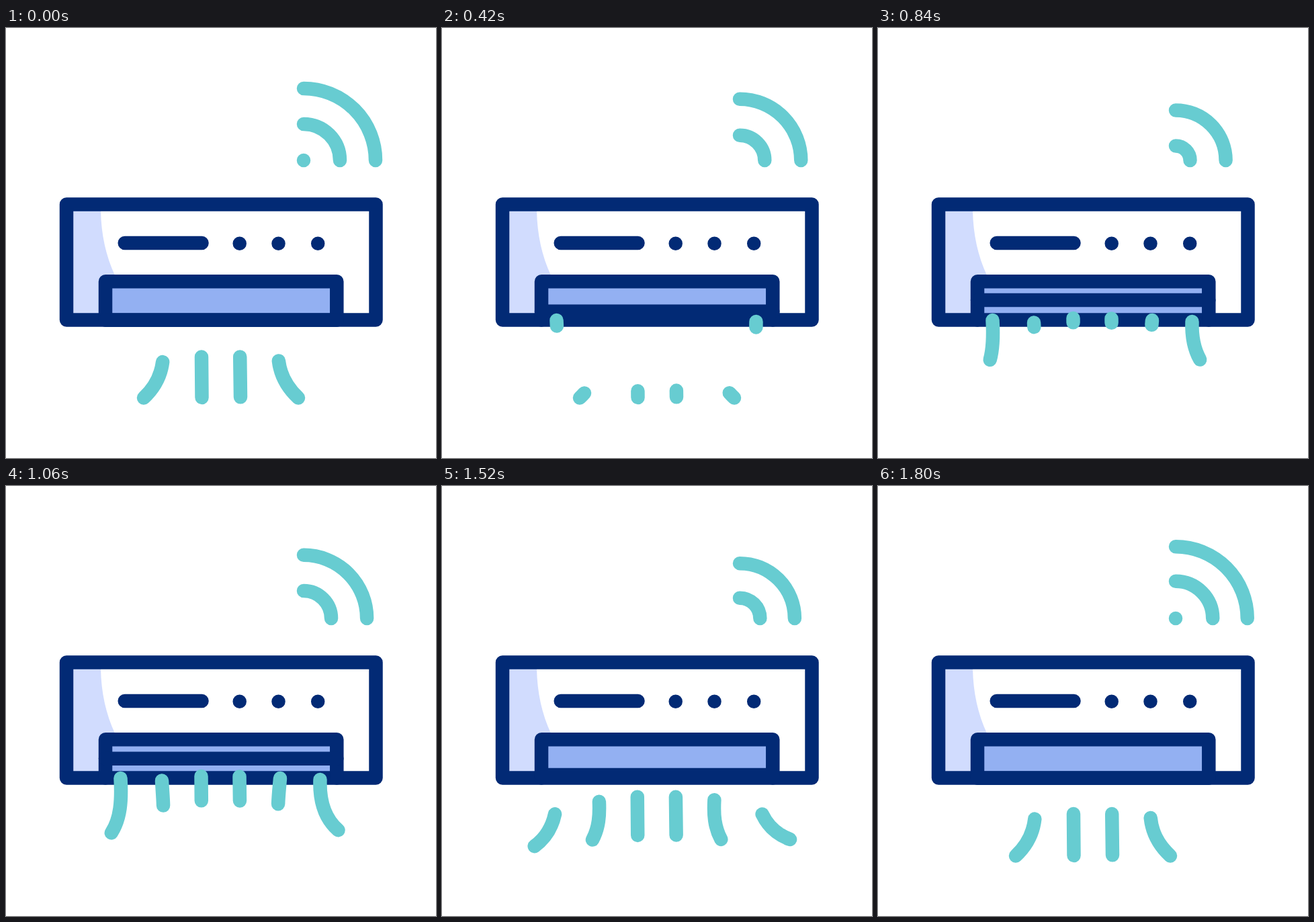
These frames come from a looping animation (640 px wide and 640 px high, 1.82 s). An HTML page:

```html
<!DOCTYPE html>
<html lang="en">
<head>
<meta charset="utf-8">
<title>Smart air conditioner</title>
<style>
  html, body { margin: 0; width: 100%; height: 100%; overflow: hidden; background: #fff; }
  svg { display: block; width: 100%; height: 100%; }
  .line { fill: none; stroke-width: 20.5; stroke-linecap: round; stroke-linejoin: round; }
  .navy { stroke: #022a75; }
  .teal { stroke: #67ccd1; }
</style>
</head>
<body>
<svg viewBox="0 0 640 640">
  <path fill="#d1dcfe" d="M95 267H141V272Q142 325 162 368V430H95Z"/>
  <rect x="148" y="377" width="344" height="57" fill="#93b0f2"/>
  <g class="line navy">
    <rect x="90" y="262.5" width="460.5" height="172"/>
    <path d="M148 434.5V377.3H492.3V434.5"/>
    <path id="louver" d="M148 0H492.3"/>
    <path d="M176.7 320H291.5M347.7 320.7h.01M405.5 320.7h.01M464.2 320.7h.01"/>
  </g>
  <g id="waves" class="line teal"></g>
  <g id="air" class="line teal"></g>
</svg>
<script>
const LOOP = 1820, STEP = 20;
const WAVE = { x: 443, y: 197, speed: 0.0888, maxRadius: 118.2,
               births: [-1205, -608, 0, 598, 1178, 1800] };

// Each track is a list of [time, fraction of the path].
const outer = {
  head: [[350, 0], [420, .073], [640, .32], [1060, .73], [1320, .9], [1520, .972], [1700, 1]],
  tail: [[1190, 0], [1320, .15], [1520, .465], [1770, 1]]
};
const innerOut = {
  head: [[790, 0], [855, .07], [1060, .308], [1320, .55], [1520, .745], [1800, 1]],
  tail: [[1175, 0], [1320, .106], [1520, .26], [1800, .475]]
};
const innerRest = { head: [[0, 1]], tail: [[0, .487], [420, .917], [500, 1]] };

const streams = [
  ['M170.5 435C173 480 169 515 135 538', [outer]],
  ['M232 438.5C234 480 242 516 205 550.5', [innerRest, innerOut]],
  ['M290.5 432L291.5 550', [innerRest, innerOut]],
  ['M347.5 432.5L349 549.3', [innerRest, innerOut]],
  ['M408 435C404 482 398 516 435 550.5', [innerRest, innerOut]],
  ['M467.5 437C466 480 482 514 521 527', [outer]]
];

function addPath(parent, d = '') {
  const path = document.createElementNS('http://www.w3.org/2000/svg', 'path');
  path.setAttribute('d', d);
  return document.getElementById(parent).appendChild(path);
}

const louver = document.getElementById('louver');
const waves = WAVE.births.map(birth => ({ birth, path: addPath('waves') }));
const trims = streams.flatMap(([d, tracks]) => tracks.map(track => {
  const path = addPath('air', d);
  return { path, track, length: path.getTotalLength() };
}));

function sample(keys, t) {
  const next = keys.findIndex(key => key[0] > t);
  if (next < 0) return keys[keys.length - 1][1];
  if (next === 0) return keys[0][1];
  const [t0, a] = keys[next - 1], [t1, b] = keys[next];
  return a + (b - a) * (t - t0) / (t1 - t0);
}

function smooth(t, from, to) {
  const u = Math.min(1, Math.max(0, (t - from) / (to - from)));
  return u * u * (3 - 2 * u);
}

function show(path, visible) {
  path.setAttribute('visibility', visible ? 'visible' : 'hidden');
}

function render(t) {
  const lift = 29.7 * (smooth(t, 100, 800) - smooth(t, 1000, 1700));
  louver.setAttribute('transform', `translate(0 ${434.8 - lift})`);

  for (const { birth, path } of waves) {
    const age = t - birth, radius = age * WAVE.speed;
    const r = Math.max(radius, 0.01);
    show(path, age >= 0 && radius <= WAVE.maxRadius);
    path.setAttribute('d',
      `M${WAVE.x} ${WAVE.y - r}A${r} ${r} 0 0 1 ${WAVE.x + r} ${WAVE.y}`);
  }

  for (const { path, track, length } of trims) {
    const head = sample(track.head, t) * length;
    const tail = sample(track.tail, t) * length;
    show(path, head > tail);
    path.setAttribute('stroke-dasharray', `${Math.max(head - tail, 0)} 1000`);
    path.setAttribute('stroke-dashoffset', -tail);
  }
}

const begin = performance.now();
function tick() {
  const t = (performance.now() - begin) % LOOP;
  render(Math.floor(t / STEP) * STEP);
  requestAnimationFrame(tick);
}
tick();
</script>
</body>
</html>
```
